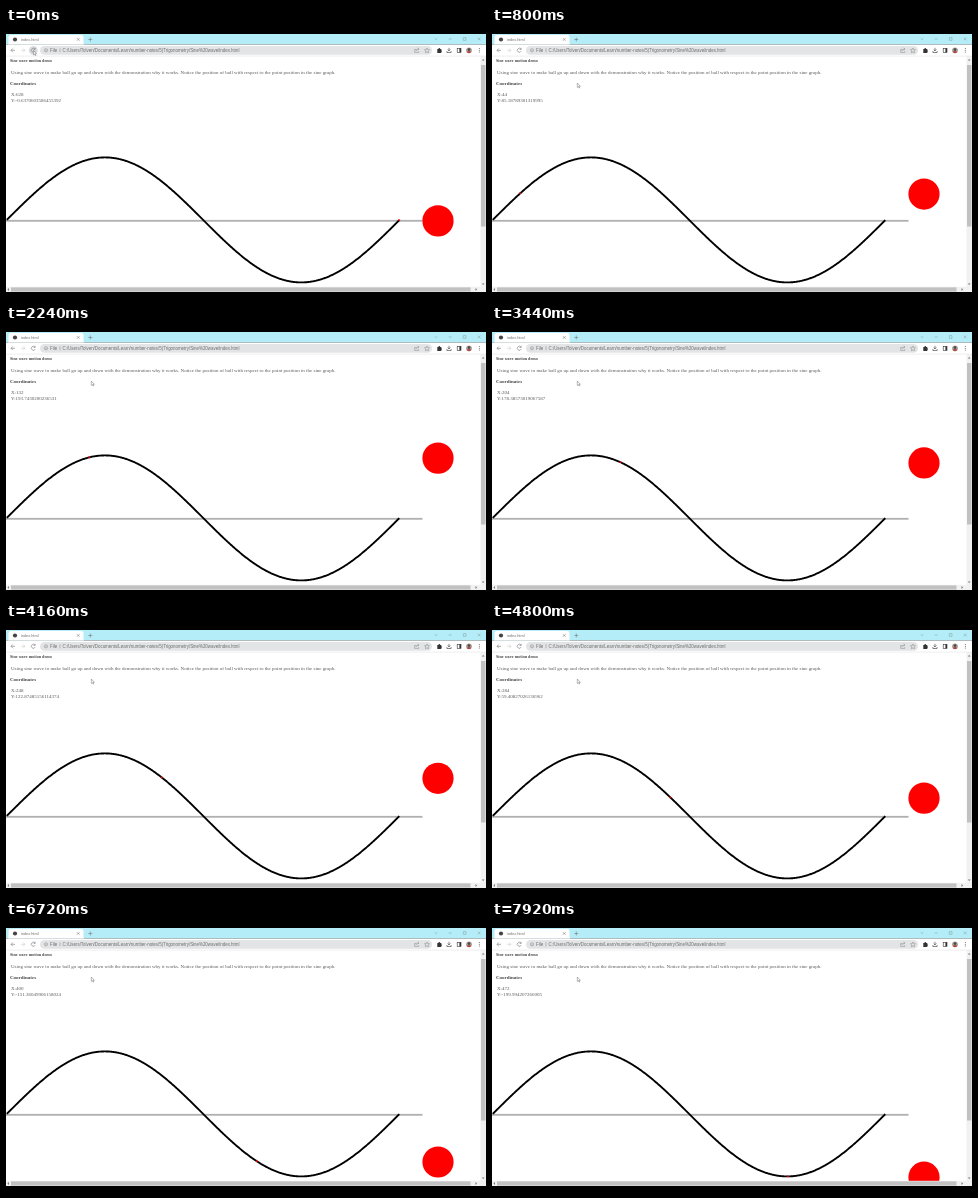
Recreate the animation shown at these times as an HTML page. Size 480 px wide and 270 px high, loop 8000 ms.

```html
<!DOCTYPE html>
<html lang="en">
<head>
<meta charset="utf-8">
<title>Sine wave</title>
<style>
html, body { margin: 0; width: 100%; height: 100%; overflow: hidden; background: #000; }
svg { display: block; width: 480px; height: 270px; }
.ui { font-family: "Liberation Sans", Arial, sans-serif; fill: #6c6c6c; }
.page { font: 5px "Liberation Serif", Times, serif; fill: #5a5a5a; }
.bold { font-weight: bold; fill: #444; }
.small { font-size: 4.15px; }
.icon { fill: none; stroke: #777; stroke-width: .6; }
.faint { stroke: #8aa; }
.thin { stroke-width: .45; }
.dark { stroke: #333; }
</style>
</head>
<body>
<svg viewBox="0 0 480 270">
  <!-- page -->
  <rect y="28" width="480" height="236" fill="#fff"/>
  <g class="page">
    <text class="bold small" x="4" y="33.8">Sine wave motion demo</text>
    <text x="5" y="46">Using sine wave to make ball go up and down with the demonstration why it works. Notice the position of ball with respect to the point position in the sine graph.</text>
    <text class="bold" x="4" y="57">Coordinates</text>
    <text id="xText" x="5" y="68"></text>
    <text id="yText" x="5" y="73.7"></text>
  </g>
  <rect y="191.9" width="416.5" height="1.8" fill="#b0b0b0"/>
  <path id="wave" fill="none" stroke="#000" stroke-width="1.9"/>
  <rect id="point" width="1.6" height="1.6" fill="#f00"/>
  <circle id="ball" cx="432" r="15.6" fill="#f00"/>

  <!-- scrollbars -->
  <rect x="474.5" y="28" width="5.5" height="236" fill="#f1f1f1"/>
  <rect y="258.8" width="480" height="5.2" fill="#f1f1f1"/>
  <rect x="475" y="37" width="4.5" height="161.5" fill="#c1c1c1"/>
  <rect x="5" y="259.4" width="459.5" height="4.2" fill="#c1c1c1"/>
  <g fill="#777">
    <path d="M475.8 32.5l1.4-1.6 1.4 1.6z"/>
    <path d="M475.8 255.5l1.4 1.6 1.4-1.6z"/>
    <path d="M3 260.1l-1.6 1.4 1.6 1.4z"/>
    <path d="M469.5 260.1l1.6 1.4-1.6 1.4z"/>
  </g>
  <rect y="264" width="480" height="6"/>

  <!-- tab strip -->
  <rect y="6" width="480" height="10.5" fill="#b4edf7"/>
  <path d="M1 16.5q1.5 0 1.5-1.5V9q0-2 2-2h71q2 0 2 2v6q0 1.5 1.5 1.5z" fill="#fff"/>
  <circle cx="9" cy="11.5" r="2.1" fill="#444"/>
  <text class="ui" x="14.8" y="12.8" font-size="3.9">index.html</text>
  <path class="icon" d="M71 10.2l2.5 2.5m0-2.5l-2.5 2.5M82.3 11.5h4m-2-2v4"/>
  <path class="icon faint" d="M428.7 10.3l1.4 1.4 1.4-1.4M442.7 11h3M457.3 9.6h2.7v2.7h-2.7zM471.8 9.6l2.7 2.7m0-2.7l-2.7 2.7"/>

  <!-- toolbar -->
  <rect y="16.5" width="480" height="11.7" fill="#fff"/>
  <rect y="27.8" width="480" height=".5" fill="#ddd"/>
  <rect x="34" y="18" width="392" height="8.8" rx="4.4" fill="#e2e4e5"/>
  <circle id="hover" cx="27.3" cy="22.3" r="4.4" fill="#d9dcdf"/>
  <path class="icon" d="M9 22.3H5m1.9-1.9L5 22.3l1.9 1.9M29 21.2a2 2 0 1 0 .2 1.8M29.2 19.8v1.6h-1.6"/>
  <path class="icon" style="stroke:#ccc" d="M15 22.3h4m-1.9-1.9l1.9 1.9-1.9 1.9"/>
  <circle class="icon thin" cx="40" cy="22.3" r="1.6"/>
  <path class="icon thin" d="M40 21.9v1.3M54 20.3v4"/>
  <g class="ui" font-size="4.42">
    <text x="44" y="23.9">File</text>
    <text x="56.5" y="23.9">C:/Users/Tolven/Documents/Learn/number-notes/5)Trigonometry/Sine%20wave/index.html</text>
  </g>
  <path class="icon thin" d="M410.3 21.5h-1.6v2.9h4v-1.2M410 23q.2-2 2.8-2m-1.2-1.3l1.3 1.3-1.3 1.3"/>
  <path class="icon thin" d="M421 20l.7 1.6 1.8.2-1.3 1.2.3 1.8-1.5-.9-1.5.9.3-1.8-1.3-1.2 1.8-.2z"/>
  <path d="M431.3 21h1.1a.9.9 0 0 1 1.8 0h1.1v1.2a.9.9 0 0 1 0 1.7v1h-4z" fill="#333"/>
  <path class="icon dark" d="M443 19.8v3m-1.4-1.3l1.4 1.4 1.4-1.4M440.9 23v1.5h4.2V23"/>
  <rect class="icon dark" x="451.2" y="20.3" width="3.8" height="4"/>
  <rect x="453.4" y="20.3" width="1.6" height="4" fill="#333"/>
  <circle cx="463" cy="22.3" r="2.9" fill="#a8a09c"/>
  <path d="M460.7 24a2.9 2.9 0 0 0 4.6 0q-2.3-2-4.6 0z" fill="#b5433e"/>
  <circle cx="463" cy="21.6" r="1.3" fill="#4c4442"/>
  <g fill="#555"><circle cx="473.3" cy="20.6" r=".5"/><circle cx="473.3" cy="22.3" r=".5"/><circle cx="473.3" cy="24" r=".5"/></g>

  <path id="cursor" d="M0 0v4.4l1-.9.7 1.6.7-.3-.7-1.5h1.4z" fill="#fff" stroke="#666" stroke-width=".45"/>
</svg>
<script>
const LOOP = 8000, SCALE = 0.3125, AXIS = 192.7;
const STEP = 4, LAST = 628, RATE = 0.015, RESTART = 20;
const PEN = 5 * SCALE; // square pen, anchored at its lower left corner
const $ = id => document.getElementById(id);
const set = (id, attrs) => {
  for (const key in attrs) $(id).setAttribute(key, attrs[key]);
};
const px = x => x * 2 * SCALE;
const py = y => AXIS - y * SCALE;

// The angle is summed step by step, so its rounding shows in the readout.
const heights = [];
let path = "";
for (let x = 0, angle = 0; x <= LAST; x++, angle += 0.01) {
  heights[x] = 200 * Math.sin(angle);
  path += `${x ? "L" : "M"}${px(x) + PEN / 2} ${py(heights[x]) - PEN / 2}`;
}
set("wave", { d: path });

function draw(t) {
  const x = t < RESTART ? LAST : STEP * Math.floor((t - RESTART) * RATE);
  const y = heights[x];
  $("xText").textContent = "X:" + x;
  $("yText").textContent = "Y:" + y;
  set("point", { x: px(x), y: py(y) - PEN });
  set("ball", { cy: py(y) });

  // pointer leaves the reload button and rests beside the heading
  const k = Math.min(1, Math.max(0, (t - 80) / 600));
  const ease = k * k * (3 - 2 * k);
  set("cursor", { transform: `translate(${27.5 + 57.8 * ease} ${22.5 + 32.5 * ease})` });
  set("hover", { opacity: ease < 0.08 ? 1 : 0 });
}

const start = performance.now();
function tick() {
  draw((performance.now() - start) % LOOP);
  requestAnimationFrame(tick);
}
draw(0);
requestAnimationFrame(tick);
</script>
</body>
</html>
```
